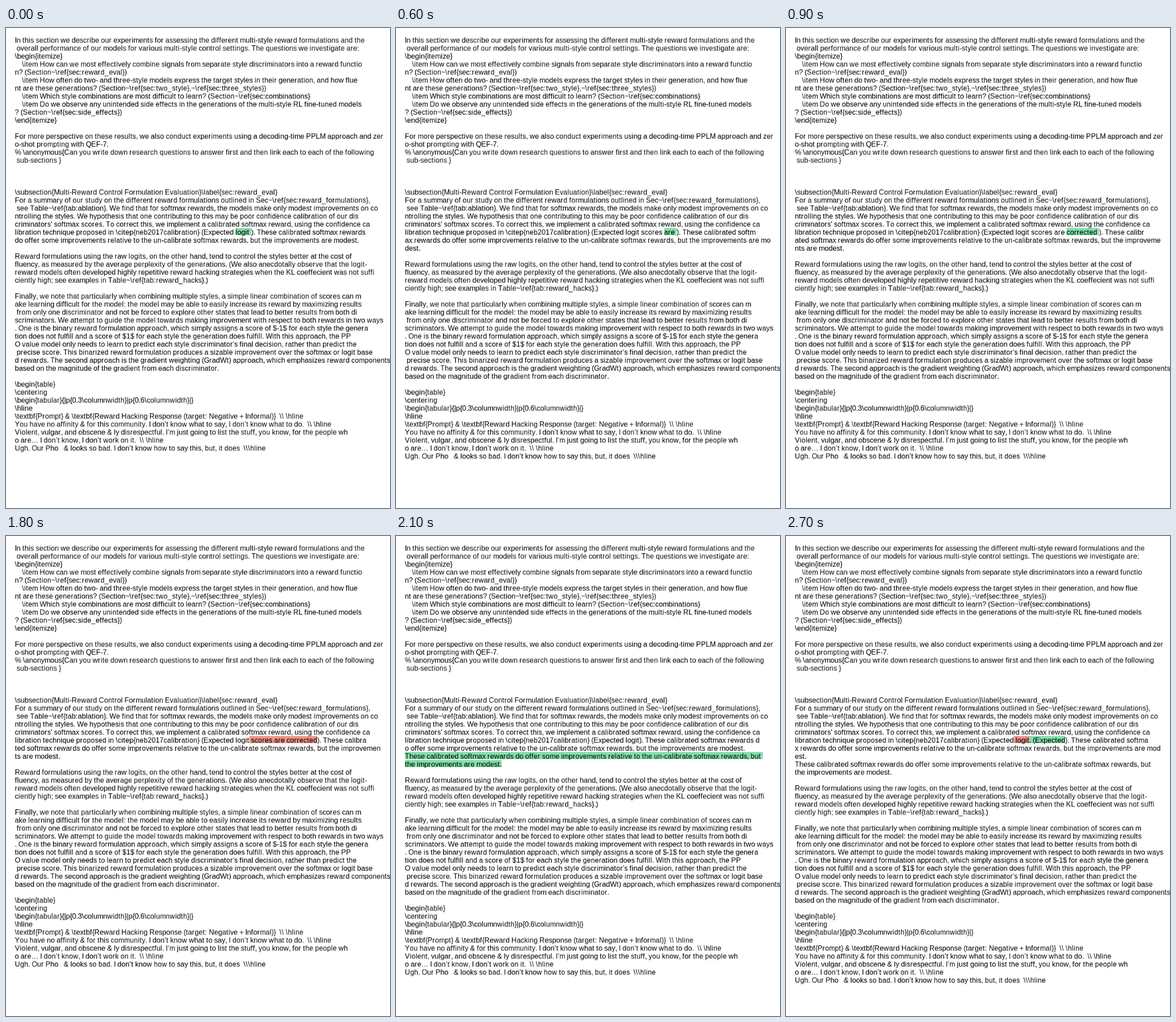
Write an HTML page with a canvas that moves like this. It is 670x836 px and loops after 3 s.

```html
<!DOCTYPE html>
<html lang="en">
<head>
<meta charset="utf-8">
<title>Text edits</title>
<style>
html, body { margin: 0; width: 100%; height: 100%; overflow: hidden; background: #fff; }
canvas { display: block; }
</style>
</head>
<body>
<canvas id="stage" width="670" height="836"></canvas>
<script>
const HEAD = String.raw`In this section we describe our experiments for assessing the different multi-style reward formulations and the overall performance of our models for various multi-style control settings. The questions we investigate are:
\begin{itemize}
    \item How can we most effectively combine signals from separate style discriminators into a reward function? (Section~\ref{sec:reward_eval})
    \item How often do two- and three-style models express the target styles in their generation, and how fluent are these generations? (Section~\ref{sec:two_style},~\ref{sec:three_styles})
    \item Which style combinations are most difficult to learn? (Section~\ref{sec:combinations}
    \item Do we observe any unintended side effects in the generations of the multi-style RL fine-tuned models? (Section~\ref{sec:side_effects})
\end{itemize}

For more perspective on these results, we also conduct experiments using a decoding-time PPLM approach and zero-shot prompting with QEF-7.
% \anonymous{Can you write down research questions to answer first and then link each to each of the following sub-sections }



\subsection{Multi-Reward Control Formulation Evaluation}\label{sec:reward_eval}
For a summary of our study on the different reward formulations outlined in Sec~\ref{sec:reward_formulations}, see Table~\ref{tab:ablation}. We find that for softmax rewards, the models make only modest improvements on controlling the styles. We hypothesis that one contributing to this may be poor confidence calibration of our discriminators' softmax scores. To correct this, we implement a calibrated softmax reward, using the confidence calibration technique proposed in \citep{neb2017calibration} (Expected`;

const CLAIM = 'These calibrated softmax rewards do offer some improvements relative to the un-calibrate softmax rewards, but the improvements are modest.';

const TAIL = String.raw`

Reward formulations using the raw logits, on the other hand, tend to control the styles better at the cost of fluency, as measured by the average perplexity of the generations. (We also anecdotally observe that the logit-reward models often developed highly repetitive reward hacking strategies when the KL coeffecient was not sufficiently high; see examples in Table~\ref{tab:reward_hacks}.)

Finally, we note that particularly when combining multiple styles, a simple linear combination of scores can make learning difficult for the model: the model may be able to easily increase its reward by maximizing results from only one discriminator and not be forced to explore other states that lead to better results from both discriminators. We attempt to guide the model towards making improvement with respect to both rewards in two ways. One is the binary reward formulation approach, which simply assigns a score of $-1$ for each style the generation does not fulfill and a score of $1$ for each style the generation does fulfill. With this approach, the PPO value model only needs to learn to predict each style discriminator's final decision, rather than predict the precise score. This binarized reward formulation produces a sizable improvement over the softmax or logit based rewards. The second approach is the gradient weighting (GradWt) approach, which emphasizes reward components based on the magnitude of the gradient from each discriminator.

\begin{table}
\centering
\begin{tabular}{|p{0.3\columnwidth}|p{0.6\columnwidth}|}
\hline
\textbf{Prompt} & \textbf{Reward Hacking Response (target: Negative + Informal)}  \\ \hline
You have no affinity & for this community. I don’t know what to say, I don’t know what to do.  \\ \hline
Violent, vulgar, and obscene & ly disrespectful. I’m just going to list the stuff, you know, for the people who are… I don’t know, I don’t work on it.  \\ \hline
Ugh. Our Pho   & looks so bad. I don’t know how to say this, but, it does  \\\hline`;

const ADD = '#82e0aa', CUT = '#f1948a';
const STEP = 300, COLS = 111, LEFT = 20, TOP = 18, SIZE = 16, LEADING = 18;

// Each state: pieces of [text, highlight] between HEAD and the claim, then pieces after it
const STATES = [
  [[[' '], ['logit ', ADD]]],
  [[[' logit '], ['scores ', ADD]]],
  [[[' logit scores '], ['are ', ADD]]],
  [[[' logit scores are '], ['corrected ', ADD]]],
  [[[' logit scores are corrected ']]],
  [[[' logit scores are corrected']]],
  [[[' logit'], [' scores are corrected', CUT]]],
  [[[' logit']], [['\n' + CLAIM, ADD]]],
  [[[' logit']], [['\n' + CLAIM]]],
  [[[' logit', CUT], ['. (Expected', ADD]], [['\n' + CLAIM]]]
];

const stage = document.getElementById('stage').getContext('2d');
const page = document.createElement('canvas');
page.width = 865;
page.height = 1080;
const pen = page.getContext('2d');
pen.font = SIZE + 'px "Liberation Sans", Arial, sans-serif';

// Whole-pixel advances, as in hinted text
const advances = { t: 5, r: 6, f: 5, '\\': 5, _: 10, ':': 5 };
const advance = ch => advances[ch] ??= Math.round(pen.measureText(ch).width);

function write(pieces) {
  let x = LEFT, y = TOP, col = 0;
  for (const [text, mark] of pieces) {
    for (const ch of text) {
      const feed = ch === '\n';
      if (feed || col === COLS) {
        x = LEFT;
        y += LEADING;
        col = 0;
      }
      col++;
      if (feed) continue;
      const w = advance(ch);
      if (mark) {
        pen.fillStyle = mark;
        pen.fillRect(x, y, w, SIZE);
      }
      pen.fillStyle = '#000';
      pen.fillText(ch, x, y + 15);
      x += w;
    }
  }
}

function draw([edit, extra = []]) {
  pen.fillStyle = '#fff';
  pen.fillRect(0, 0, page.width, page.height);
  write([[HEAD], ...edit, ['). ' + CLAIM], ...extra, [TAIL]]);
  stage.drawImage(page, 0, 0, 670, 836);
}

let shown = -1;
const start = performance.now();
function tick() {
  const now = Math.floor((performance.now() - start) / STEP) % STATES.length;
  if (now !== shown) draw(STATES[shown = now]);
  requestAnimationFrame(tick);
}
tick();
</script>
</body>
</html>
```
